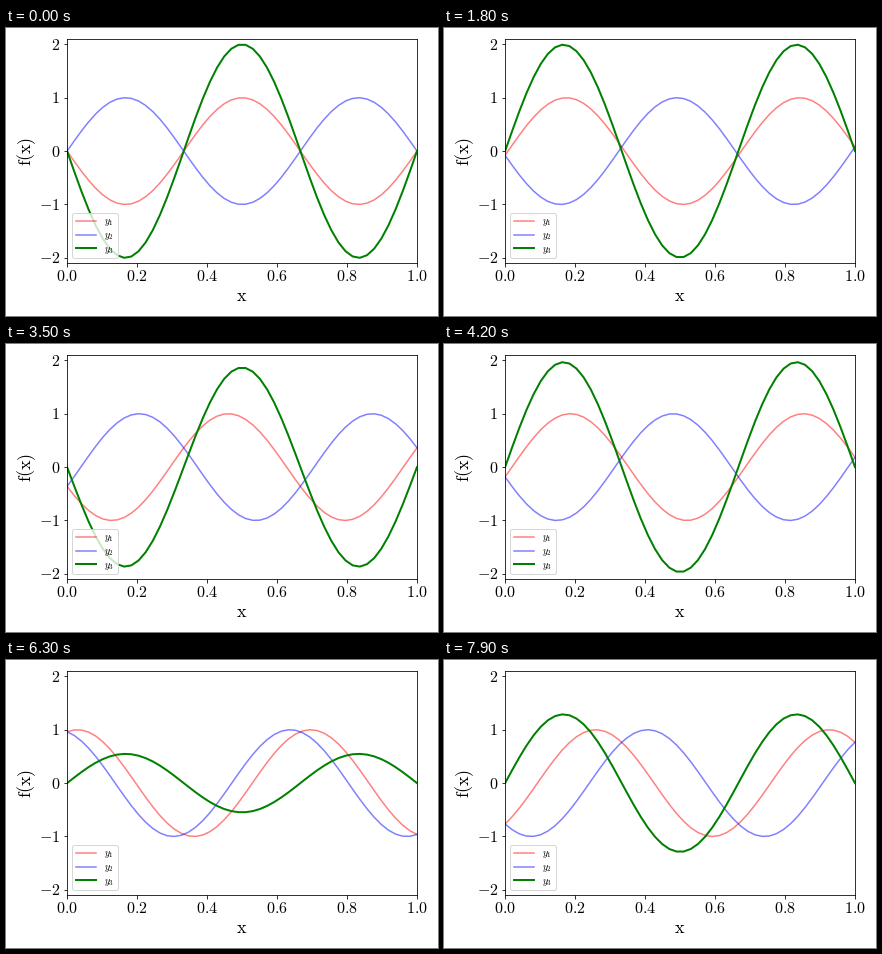
A matplotlib script that plays this animation: 432 by 288 pixels, repeating every 8 s.

```python
import numpy as np
import matplotlib.pyplot as plt
from matplotlib.animation import FuncAnimation
from matplotlib.patches import FancyBboxPatch

plt.rcParams["mathtext.fontset"] = "cm"

W, H = 432, 288
LEFT, RIGHT, TOP, BOTTOM = 61.1, 411.0, 11.0, 235.2
FRAMES, INTERVAL = 80, 100
K = 3 * np.pi                 # wave number
STEP = 20 * np.pi / 119       # phase advance per frame
TICK, LABEL, SMALL = 16, 18, 10

fig = plt.figure(figsize=(W / 72, H / 72), dpi=72, facecolor="white")
ax = fig.add_axes([LEFT / W, 1 - BOTTOM / H,
                   (RIGHT - LEFT) / W, (BOTTOM - TOP) / H])
ax.set_xlim(0, 1)
ax.set_ylim(-2.1, 2.1)
ax.set_xticks(np.linspace(0, 1, 6))
ax.set_yticks(range(-2, 3))
ax.tick_params(labelbottom=False, labelleft=False)

# Overlay in pixel coordinates for text and legend
page = fig.add_axes([0, 0, 1, 1])
page.set_xlim(0, W)
page.set_ylim(H, 0)
page.axis("off")


def put(x, y, text, size, ha="center", **kw):
    page.text(x, y, f"${text}$", fontsize=size, ha=ha, va="baseline", **kw)


for v in np.linspace(0, 1, 6):
    put(LEFT + v * (RIGHT - LEFT), BOTTOM + 18.1, f"{v:.1f}", TICK)

middle = (TOP + BOTTOM) / 2
unit = (BOTTOM - TOP) / 4.2
for v in range(-2, 3):
    put(LEFT - 7, middle - v * unit + 5.55, str(v), TICK, ha="right")

put((LEFT + RIGHT) / 2, 272.9, r"\mathrm{x}", LABEL)
put(25.2, middle, r"\mathrm{f(x)}", LABEL, rotation=90, rotation_mode="anchor")

styles = [
    dict(color="red", lw=1.5, alpha=0.5),
    dict(color="blue", lw=1.5, alpha=0.5),
    dict(color="green", lw=2),
]

page.add_patch(FancyBboxPatch(
    (66.1, 185.2), 45.6, 44.9, boxstyle="round,pad=0,rounding_size=2",
    facecolor="white", edgecolor="0.8", lw=1, alpha=0.8, snap=True))
for i, style in enumerate(styles):
    y = 192.6 + 13.9 * i
    page.plot([70.1, 90.1], [y, y], **style)
    put(98.1, y + 3.5, f"y_{i + 1}", SMALL, ha="left")

x = np.linspace(0, 1, 50)
lines = [ax.plot(x, 0 * x, **style)[0] for style in styles]


def update(n):
    phase = np.pi + STEP * n
    y1 = np.sin(K * x - phase)
    y2 = -np.sin(K * x + phase)
    for line, y in zip(lines, (y1, y2, y1 - y2)):
        line.set_ydata(y)
    return lines


anim = FuncAnimation(fig, update, frames=FRAMES, interval=INTERVAL,
                     repeat=True, repeat_delay=0, blit=False)
plt.show()
```
